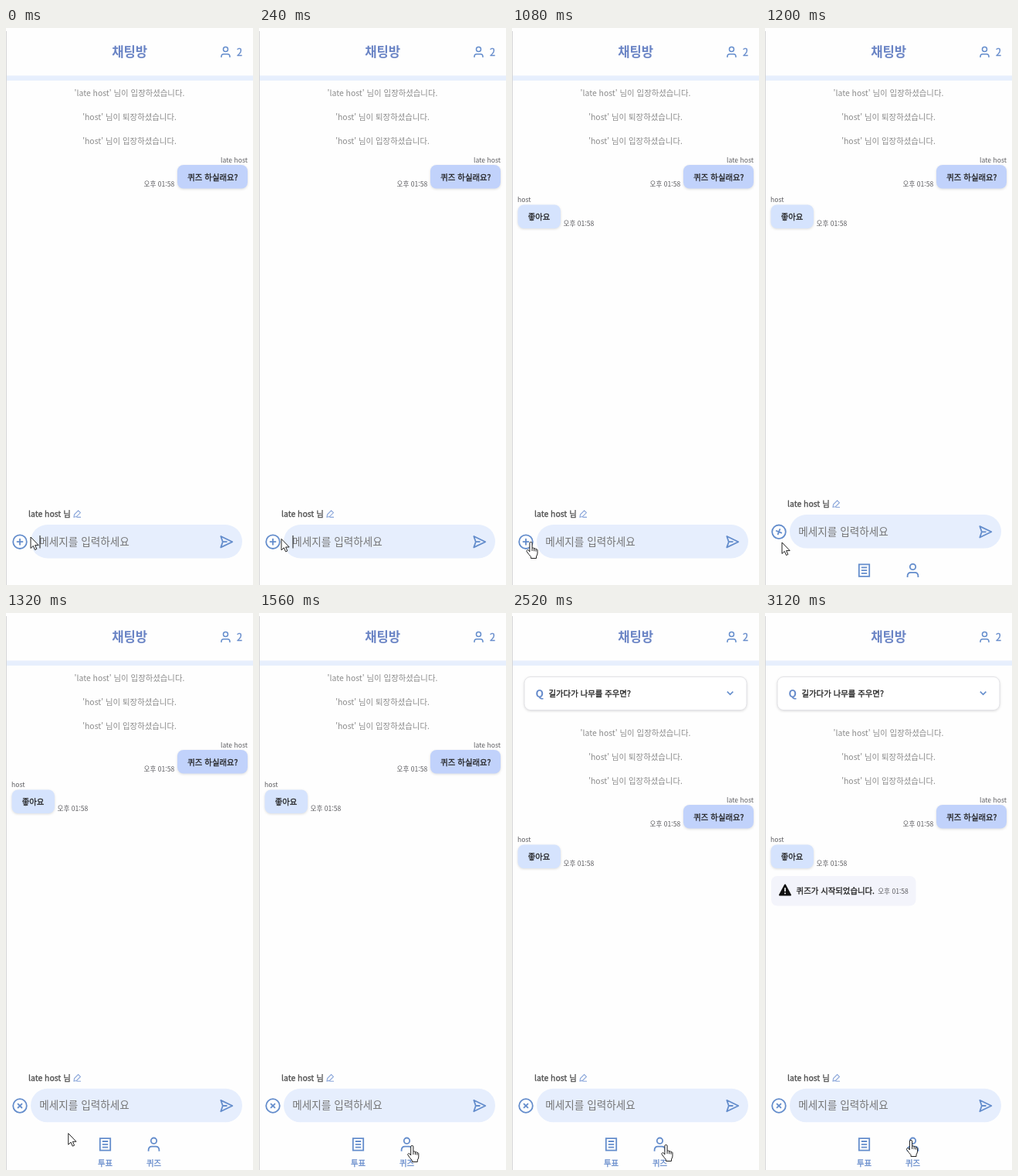
An HTML page that plays this animation: 320x720 px, repeating every 3240 ms.

```html
<!DOCTYPE html>
<html lang="ko">
<head>
<meta charset="utf-8">
<title>채팅방</title>
<style>
  html, body { margin: 0; height: 100%; overflow: hidden; background: #fefefe; }
  svg { display: block; width: 100vw; height: 100vh; }
  text { font: 10.4px "Noto Sans CJK KR", "Noto Sans CJK JP", "Noto Sans CJK", sans-serif; fill: #222; }
  .title { font-size: 16.7px; font-weight: 700; fill: #6a84c5; }
  .notice { fill: #8b8b8b; }
  .small { font-size: 8.6px; fill: #5c5c60; }
  /* a hairline outline gives the medium weight */
  .medium { stroke: #222; stroke-width: .3; }
  .blue { fill: #668bcb; }
  .blue.medium { stroke: #668bcb; }
  .middle { text-anchor: middle; }
  .end { text-anchor: end; }
  .icon { fill: none; stroke: #648dcc; stroke-width: 1.8; }
  .thin { stroke-width: 1.5; }
  .bubble { filter: drop-shadow(0 1.5px 1.5px #0002); }
  .cursor { fill: #fff; stroke: #222; stroke-width: 1; stroke-linejoin: round; }
</style>
</head>
<body>
<svg viewBox="0 0 320 720">
  <path d="M.5 4V720" stroke="#d6d6d8"/>

  <!-- header -->
  <rect x="1" y="61.5" width="319" height="6.5" fill="#e7effd"/>
  <text class="title middle" x="160.2" y="37.3">채팅방</text>
  <g class="icon thin">
    <circle cx="284.5" cy="27.6" r="3"/>
    <path d="M279 38V36.8Q279 33.7 282 33.7H287Q290 33.7 290 36.8V38"/>
  </g>
  <text class="blue medium" style="font-size:12.8px" x="299" y="36.2">2</text>

  <!-- quiz card -->
  <g id="card">
    <rect class="bubble" x="16" y="82.5" width="288" height="43" rx="8" fill="#fff" stroke="#e2e2e6"/>
    <text class="blue" style="font-size:13.6px;font-weight:700" x="30.5" y="108.8">Q</text>
    <text class="medium" x="47.5" y="107.6">길가다가 나무를 주우면?</text>
    <path class="icon thin" d="M278.8 101.6l3.8 3.8 3.8-3.8"/>
  </g>

  <!-- conversation -->
  <g id="chat">
    <text class="notice middle" x="160" y="88">'late host' 님이 입장하셨습니다.</text>
    <text class="notice middle" x="160" y="119">'host' 님이 퇴장하셨습니다.</text>
    <text class="notice middle" x="160" y="149.8">'host' 님이 입장하셨습니다.</text>
    <text class="small end" x="313" y="173.5">late host</text>
    <rect class="bubble" x="222" y="177" width="91" height="30.5" rx="8" fill="#c1d2fb"/>
    <text class="medium" x="235.3" y="196.7">퀴즈 하실래요?</text>
    <text class="small end" x="218.3" y="204.7">오후 01:58</text>
    <g id="reply">
      <text class="small" x="7" y="225">host</text>
      <rect class="bubble" x="7.5" y="228.5" width="55.5" height="30.5" rx="8" fill="#d5e3fd"/>
      <text class="medium" x="20.7" y="247.9">좋아요</text>
      <text class="small" x="66.6" y="256">오후 01:58</text>
    </g>
    <g id="alert">
      <rect x="8" y="269" width="187.5" height="38.5" rx="8" fill="#f3f4fb"/>
      <path d="M26 280.5L33 293.5H19Z" stroke="#111" stroke-width="2" stroke-linejoin="round" fill="#111"/>
      <path d="M26 284.3V289M26 290.6V292.3" stroke="#fff" stroke-width="1.7"/>
      <text class="medium" x="40.6" y="292.2">퀴즈가 시작되었습니다.</text>
      <text class="small" x="146.2" y="291.5">오후 01:58</text>
    </g>
  </g>

  <!-- message bar and its menu -->
  <g id="bar">
    <text class="medium" x="29" y="631.8" opacity=".8">late host 님</text>
    <path class="icon" d="M88 632.2l.6-3.4 5-5 2.8 2.8-5 5zM91.5 632.4H97" style="stroke:#8aa6da;stroke-width:1.1"/>
    <rect x="32" y="642" width="274" height="43.5" rx="21.7" fill="#e6eefd"/>
    <text style="font-size:13.6px;fill:#757575" x="43.3" y="668.6">메세지를 입력하세요</text>
    <path id="caret" d="M44 656V672.5" stroke="#111"/>
    <path class="icon" d="M278.3 657L293.3 664.2 278.3 671.4 280.8 664.2ZM280.8 664.2H286.5" stroke-linejoin="round"/>
    <g class="icon">
      <circle cx="18" cy="664.2" r="8.8"/>
      <path id="plus" d="M-4.2 0H4.2M0 -4.2V4.2"/>
    </g>
    <g id="menu">
      <g class="icon">
        <path d="M121.8 706.3H135.2V721.8H121.8ZM124.8 710.2H132.2M124.8 714H132.2M124.8 717.8H132.2"/>
        <circle cx="191.5" cy="709.4" r="3.7"/>
        <path d="M184.6 723V721.5Q184.6 716.8 189 716.8H194Q198.4 716.8 198.4 721.5V723"/>
      </g>
      <text class="blue medium middle" x="128.5" y="742.3">투표</text>
      <text class="blue medium middle" x="191.5" y="742.3">퀴즈</text>
    </g>
  </g>

  <path id="arrow" class="cursor" d="M0 0V14.5L3.3 11.4 5.5 16.5 7.8 15.5 5.6 10.6H10.2Z"/>
  <path id="hand" class="cursor" d="M-1.6 13V2A1.6 1.6 0 0 1 1.6 2V8.5A1.5 1.5 0 0 1 4.2 9A1.5 1.5 0 0 1 6.5 9.7A1.4 1.4 0 0 1 8.5 11V15Q8.5 17 7 19V21.5H0V19.5Q-2.5 17 -5.5 12.5A1.5 1.5 0 0 1 -3.2 10.9ZM1.6 8.5V12M4.2 9V12.3M6.5 9.7V12.6"/>
</svg>
<script>
  const LOOP = 3240, STEP = 120, MENU_SHIFT = 27.2, CARD_SHIFT = 71;
  const $ = id => document.getElementById(id);
  const clamp = v => Math.min(1, Math.max(0, v));
  const smooth = v => v * v * (3 - 2 * v);
  const show = (id, on) => $(id).setAttribute('visibility', on ? 'visible' : 'hidden');
  const move = (id, x, y, more = '') => $(id).setAttribute('transform', `translate(${x} ${y}) ${more}`);

  // pointer stops: time, x, y
  const stops = [
    [0, 32, 658], [600, 24.5, 664], [1080, 24.5, 664], [1200, 22, 665],
    [1560, 198.3, 688], [1800, 198.3, 688], [2160, 199.5, 687],
    [2640, 199.5, 687], [3120, 189, 681], [LOOP, 189, 681]
  ];

  function pointerAt(t) {
    const i = stops.findIndex(s => s[0] > t);
    const [t0, x0, y0] = stops[i - 1], [t1, x1, y1] = stops[i];
    const k = (t - t0) / (t1 - t0);
    return [x0 + (x1 - x0) * k, y0 + (y1 - y0) * k];
  }

  function draw(t) {
    const open = smooth(clamp((t - 1084) / 240));
    move('bar', 0, -MENU_SHIFT * open);
    move('plus', 18, 664.2, `rotate(${45 * open})`);
    $('menu').setAttribute('opacity', clamp(open * 2.2));

    const quiz = t >= 2520;
    show('card', quiz);
    move('chat', 0, quiz ? CARD_SHIFT : 0);
    show('reply', t >= 360);
    show('alert', t >= 2760);
    show('caret', t < 480);

    const [x, y] = pointerAt(t);
    const pointing = (t >= 480 && t < 1200) || t >= 1560;
    show('hand', pointing);
    show('arrow', !pointing);
    move(pointing ? 'hand' : 'arrow', x, y);
  }

  const start = performance.now();
  function tick() {
    const t = (performance.now() - start) % LOOP;
    draw(Math.floor(t / STEP) * STEP);
    requestAnimationFrame(tick);
  }
  tick();
</script>
</body>
</html>
```
